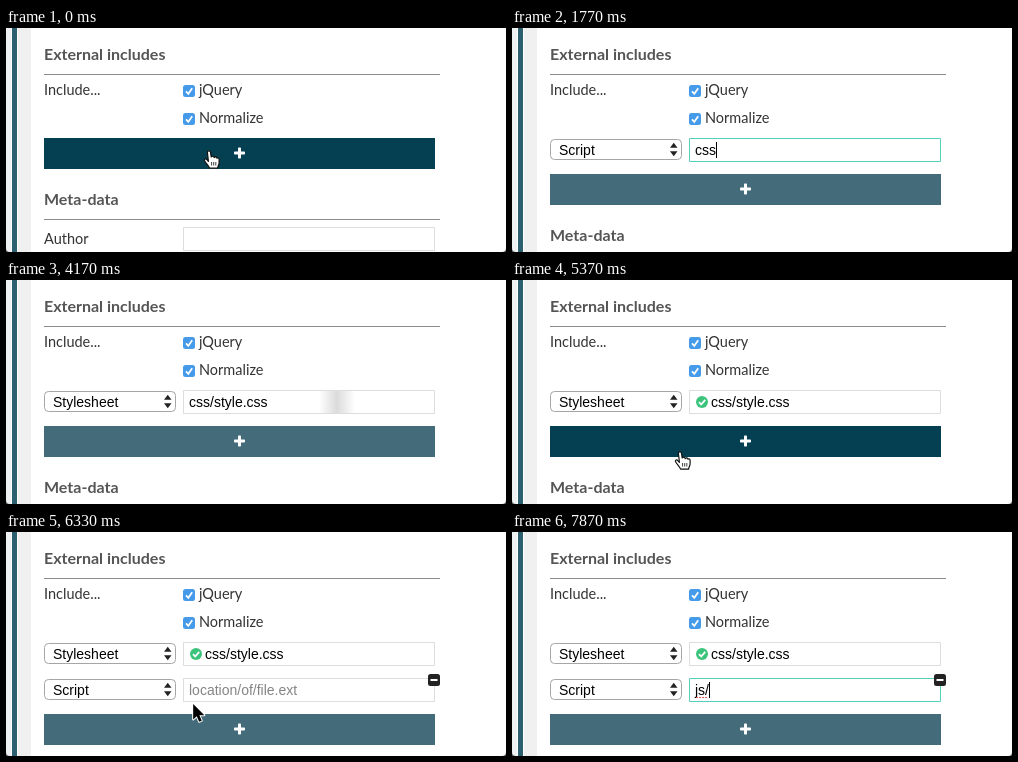
An HTML page with a canvas for the animation above (8000 ms loop, 500 by 224 pixels).

```html
<!DOCTYPE html>
<html lang="en">
<head>
<meta charset="utf-8">
<title>External includes</title>
<style>
html, body { margin: 0; width: 100%; height: 100%; overflow: hidden; background: #fff; }
canvas { display: block; width: 500px; height: 224px; }
</style>
</head>
<body>
<canvas id="stage"></canvas>
<script>
const LOOP = 8000, W = 500, H = 224, ROW = 36;
const canvas = document.getElementById('stage');
const dpr = window.devicePixelRatio || 1;
canvas.width = W * dpr;
canvas.height = H * dpr;
const c = canvas.getContext('2d');

const LABEL = '14.5px Lato, "Open Sans", sans-serif';
const TITLE = 'bold 16px Lato, "Open Sans", sans-serif';
const FIELD = '14px "Liberation Sans", Arial, sans-serif';

const PATH_KEYS = 'css/style.css';
const PATH_TIMES = [1330, 1470, 1600, 2030, 2300, 2370, 2530, 2700, 2870, 3130, 3330, 3400, 3630];
const JS_TIMES = [7230, 7370, 7670];

// Pointer stops: time, x, y
const POINTER = [
  [0, 203, 123], [330, 203, 123], [680, 240, 122], [1330, 240, 122],
  [5070, 226, 134], [5370, 168, 172], [5700, 171, 177], [5960, 171, 177],
  [6300, 187, 172], [6560, 192, 172], [6800, 215, 158], [7230, 215, 158]
];

const clamp = v => Math.max(0, Math.min(1, v));
const ramp = (t, a, b) => clamp((t - a) / (b - a));
const swing = p => 0.5 - Math.cos(Math.PI * p) / 2;
const ease = (t, a, b) => swing(ramp(t, a, b));
const mix = (a, b, p) => a + (b - a) * p;
const blend = (a, b, p) => `rgb(${a.map((v, i) => Math.round(mix(v, b[i], p)))})`;
const typed = (text, times, t) => text.slice(0, times.filter(k => k <= t).length);

function rect(x, y, w, h, fill) {
  c.fillStyle = fill;
  c.fillRect(x, y, w, h);
}

function round(x, y, w, h, r, fill, stroke) {
  c.beginPath();
  c.roundRect(x, y, w, h, r);
  if (fill) { c.fillStyle = fill; c.fill(); }
  if (stroke) { c.strokeStyle = stroke; c.lineWidth = 1; c.stroke(); }
}

function text(s, x, y, font, fill) {
  c.font = font;
  c.fillStyle = fill;
  c.fillText(s, x, y);
}

function line(points, color, width) {
  c.beginPath();
  points.forEach(([x, y]) => c.lineTo(x, y));
  c.strokeStyle = color;
  c.lineWidth = width;
  c.stroke();
}

function title(s, y) {
  text(s, 38, y + 5, TITLE, '#555');
  rect(38, y + 19, 396, 1, '#8c8c8c');
}

function checkbox(y, label) {
  round(177, y, 12, 12, 2.5, '#459bea');
  line([[180, y + 6.3], [182.3, y + 8.8], [186.2, y + 3.2]], '#fff', 1.7);
  text(label, 193, y + 10, LABEL, '#333');
}

function select(y, value) {
  round(38.5, y + 1.5, 131, 20, 4, '#fff', '#a6a6a6');
  text(value, 47, y + 17, FIELD, '#000');
  c.fillStyle = '#222';
  for (const dir of [-1, 1]) {
    const base = y + 11.5 + dir * 1.8;
    c.beginPath();
    c.moveTo(158, base);
    c.lineTo(165.5, base);
    c.lineTo(161.75, base + dir * 5);
    c.fill();
  }
}

function input(y, o) {
  round(177.5, y + 0.5, 251, 23, 0, '#fff', blend([221, 221, 221], [86, 207, 187], o.focus));
  if (o.sweep > 0 && o.sweep < 1) {
    const x = 177 + 252 * o.sweep;
    const g = c.createLinearGradient(x - 18, 0, x + 18, 0);
    g.addColorStop(0, 'rgba(215,215,215,0)');
    g.addColorStop(0.5, 'rgba(215,215,215,.9)');
    g.addColorStop(1, 'rgba(215,215,215,0)');
    c.save();
    c.beginPath();
    c.rect(178, y + 1, 250, 22);
    c.clip();
    rect(x - 18, y + 1, 36, 22, g);
    c.restore();
  }
  const x = 183 + 16 * o.valid;
  text(o.value || 'location/of/file.ext', x, y + 17, FIELD, o.value ? '#000' : '#858585');
  if (o.caret) rect(Math.round(x + c.measureText(o.value).width), y + 4, 1, 16, '#000');
  if (o.valid) {
    c.globalAlpha = o.valid;
    round(184, y + 6, 12, 12, 6, '#3cc47c');
    line([[187, y + 12.2], [189.2, y + 14.5], [193.2, y + 9.8]], '#fff', 1.8);
    c.globalAlpha = 1;
  }
}

function button(y, hover) {
  rect(38, y, 391, 31, blend([68, 107, 122], [4, 63, 82], hover));
  round(228, y + 13.5, 11, 3, 0.8, '#fff');
  round(232, y + 9.5, 3, 11, 0.8, '#fff');
}

function clipped(y, h, draw) {
  if (h <= 0) return;
  c.save();
  c.beginPath();
  c.rect(30, y, 420, h);
  c.clip();
  draw();
  c.restore();
}

const ARROW = new Path2D('M0 0V15.5L3.6 12.2L6 17.8L8.6 16.7L6.2 11.3H11.2Z');
const HAND = new Path2D('M-1.6 1.2C-1.6-.6 1.2-.6 1.5 1.2L2.2 6C3-.1+5 5 5.2 6.6C6 5.4 7.6 5.7 7.9 7.2C9 6.4 10.1 7 10.1 8.5V12C10 14 8.8 15 8.6 17.2H.6C.2 15-3 12.6-4.4 9.8C-5.2 8-3.2 7.3-2 8.8L-.6 10.3Z'.replace('C3-.1+5 5 5.2 6.6', 'C3 4.8 4.8 5 5.2 6.6'));

function pointer(t, buttonY) {
  const i = POINTER.findIndex(k => k[0] > t);
  if (i < 1 || (t >= 1330 && t < 5070)) return;
  const [a, b] = [POINTER[i - 1], POINTER[i]];
  const p = ease(t, a[0], b[0]);
  const x = mix(a[1], b[1], p), y = mix(a[2], b[2], p);
  c.save();
  c.translate(x, y);
  c.lineJoin = 'round';
  if (y >= buttonY && y < buttonY + 31) {
    c.fillStyle = '#fff';
    c.strokeStyle = '#111';
    c.lineWidth = 1.2;
    c.fill(HAND);
    c.stroke(HAND);
    for (const k of [2.6, 4.7, 6.8]) line([[k, 11], [k, 14.5]], '#111', 0.8);
  } else if (x > 177 && y < buttonY - 12) {
    for (const [color, w] of [['#fff', 2.6], ['#111', 1.2]]) {
      line([[-3, -7.5], [-1, -7.5], [0, -6.5], [0, 6.5], [-1, 7.5], [-3, 7.5]], color, w);
      line([[3, -7.5], [1, -7.5], [0, -6.5], [0, 6.5], [1, 7.5], [3, 7.5]], color, w);
      line([[-2, 3], [2, 3]], color, w);
    }
  } else {
    c.strokeStyle = '#fff';
    c.lineWidth = 2;
    c.stroke(ARROW);
    c.fillStyle = '#000';
    c.fill(ARROW);
  }
  c.restore();
}

function corners() {
  c.beginPath();
  c.rect(0, 0, W, H);
  c.roundRect(0, -6, W, H + 6, 4);
  c.fillStyle = '#555';
  c.fill('evenodd');
}

function draw(t) {
  c.setTransform(dpr, 0, 0, dpr, 0, 0);
  rect(0, 0, W, H, '#fff');
  rect(0, 0, 5, H, '#eef1f2');
  rect(6, 0, 5, H, '#2c6070');
  rect(12, 0, 13, H, '#f0f0f0');

  const first = ROW * ease(t, 30, 430);
  const second = ROW * ease(t, 5890, 6290);
  const shift = first + second;
  const buttonY = 110 + shift;

  title('External includes', 27);
  text('Include...', 38, 67, LABEL, '#333');
  checkbox(57, 'jQuery');
  checkbox(85, 'Normalize');

  clipped(106, first + 4, () => {
    if (t < 30) return;
    select(110, t < 4030 ? 'Script' : 'Stylesheet');
    input(110, {
      value: typed(PATH_KEYS, PATH_TIMES, t),
      focus: ramp(t, 750, 830) * (1 - ramp(t, 4000, 4150)),
      caret: t >= 790 && t < 4000,
      sweep: ramp(t, 4000, 4280),
      valid: ease(t, 4260, 4370)
    });
  });

  clipped(146, second, () => {
    select(146, 'Script');
    input(146, {
      value: typed('js/', JS_TIMES, t),
      focus: ramp(t, 6800, 6900),
      caret: t >= 6830,
      sweep: 0,
      valid: 0
    });
    if (t >= 7850) {
      for (let x = 184; x < 194; x += 3) rect(x, 165, 2, 1, '#e0615c');
    }
  });

  button(buttonY, 1 - ramp(t, 200, 450) + ramp(t, 5120, 5340) - ramp(t, 6030, 6280));
  title('Meta-data', 172 + shift);
  text('Author', 38, 216 + shift, LABEL, '#333');
  round(177.5, 199.5 + shift, 251, 23, 0, '#fff', '#ddd');

  const remove = ramp(t, 6080, 6250);
  if (remove) {
    c.globalAlpha = remove;
    round(422, 142, 12, 12, 2.5, '#222');
    rect(424.5, 147, 7, 2, '#fff');
    c.globalAlpha = 1;
  }

  pointer(t, buttonY);
  corners();
}

const start = performance.now();
function tick() {
  draw((performance.now() - start) % LOOP);
  requestAnimationFrame(tick);
}
tick();
</script>
</body>
</html>
```
